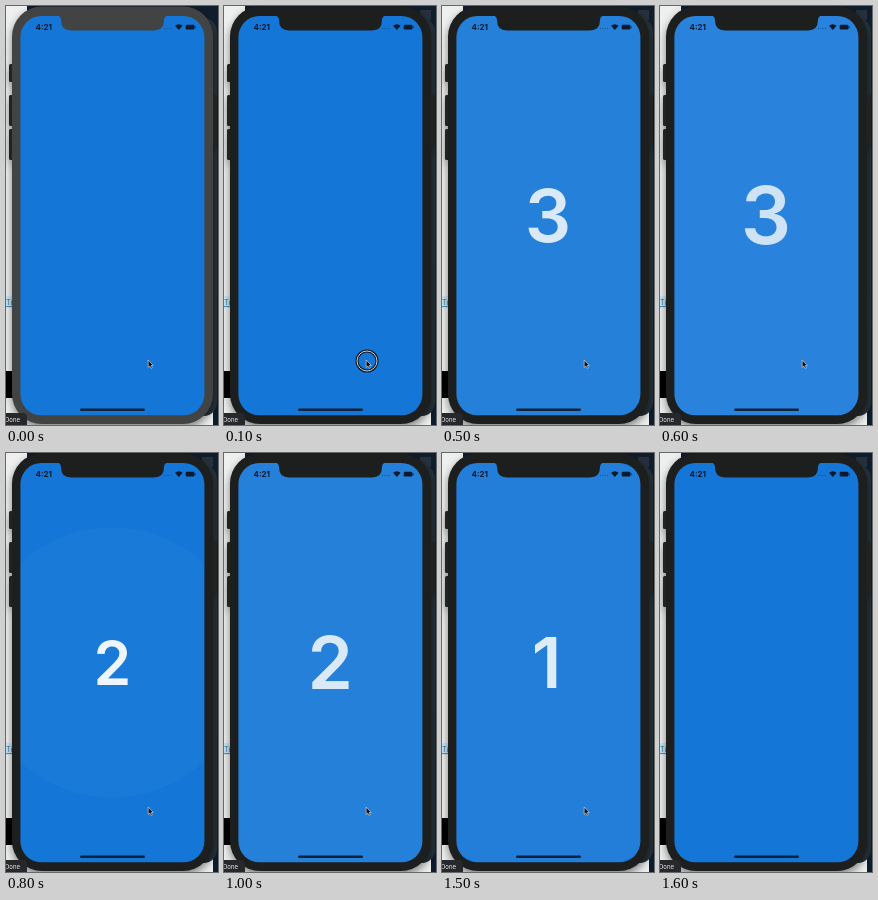
These frames come from a looping animation (212 by 419 pixels, 1700 ms). An HTML page:

```html
<!DOCTYPE html>
<html lang="en">
<head>
<meta charset="utf-8">
<style>
  html, body { margin: 0; width: 100%; height: 100%; overflow: hidden; }
  svg { display: block; width: 212px; height: 419px; font-family: Inter, sans-serif; }
  .shadow { filter: drop-shadow(0 4px 4px #0007); }
</style>
</head>
<body>
<svg viewBox="0 0 212 419">
  <defs>
    <clipPath id="screen"><rect x="14.4" y="10" width="184" height="399.3" rx="21"/></clipPath>
    <linearGradient id="desk" x2="0" y2="1">
      <stop offset="0" stop-color="#0f1d2d"/>
      <stop offset=".5" stop-color="#12263a"/>
      <stop offset="1" stop-color="#0b1c2e"/>
    </linearGradient>
  </defs>

  <!-- desktop behind the phone -->
  <rect width="212" height="419" fill="url(#desk)"/>
  <rect width="21" height="419" fill="#eeefef"/>
  <rect y="385" width="207" height="34" fill="#eeefef"/>
  <rect x="185" y="12" width="26" height="398" rx="14" fill="#26323a"/>
  <rect id="corner" x="196" y="4" width="11" height="10" fill="#26313d"/>
  <rect y="290" width="6" height="12" fill="#cfe6f3"/>
  <text x="0" y="299" font-size="7" fill="#1878ac" text-decoration="underline">Ti</text>
  <rect y="365" width="7" height="27" fill="#000"/>

  <!-- phone -->
  <g class="shadow">
    <g fill="#202321">
      <rect x="3" y="58" width="6" height="18" rx="1.5"/>
      <rect x="3" y="89" width="6" height="31" rx="1.5"/>
      <rect x="3" y="123" width="6" height="31" rx="1.5"/>
      <rect x="204" y="89" width="7" height="51" rx="1.5"/>
    </g>
    <rect id="body" x="6" y="0.5" width="201" height="417.5" rx="30"/>
  </g>
  <path d="M0 407H17Q21 407 21 411V419H0Z" fill="#26282b"/>
  <text x="-1" y="416" font-size="6" fill="#eee">Done</text>
  <g clip-path="url(#screen)">
    <rect x="14" y="10" width="185" height="400" fill="#1476d7"/>
    <circle id="ripple" cx="106" cy="209.5" fill="#fff"/>
    <text id="digit" text-anchor="middle" font-weight="600" fill="#fff"></text>
  </g>
  <path id="notch" d="M51 9.5Q55 10 55 14Q55 24.5 65 24.5H148Q158 24.5 158 14Q158 10 162 9.5Z"/>
  <g fill="#0b1a2c">
    <text x="29.5" y="24" font-size="8" font-weight="700">4:21</text>
    <path d="M158 22.5h8" stroke="#0d559b" stroke-dasharray="1 1.3" fill="none"/>
    <path d="M169 19.8Q172.8 16.6 176.6 19.8L172.8 24Z"/>
    <rect x="179.7" y="18.8" width="8.7" height="4.7" rx="1.2"/>
    <rect x="188.7" y="20.2" width=".8" height="2"/>
    <rect x="74" y="402.5" width="65" height="2.5" rx="1.25" fill="#10233a"/>
  </g>

  <g id="ring" fill="none">
    <circle cx="143" cy="355" r="10" stroke="#10151b" stroke-width="3"/>
    <circle cx="143" cy="355" r="10" stroke="#dfe6ec" stroke-width=".9"/>
  </g>
  <path id="cursor" d="M142.2 354V361.4L143.8 360L145 362.4L146.300 361.800L145.200 359.500H147.300Z" fill="#0a0a0a" stroke="#dfe8f2" stroke-width=".6"/>
</svg>
<script>
const el = id => document.getElementById(id);
const set = (id, attrs) => {
  for (const name in attrs) el(id).setAttribute(name, attrs[name]);
};
const show = (id, on) => set(id, { visibility: on ? 'visible' : 'hidden' });

const LOOP = 1700, STEP = 100, END = 1600;
const counts = [
  { value: 3, start: 154, x: 106 },
  { value: 2, start: 654, x: 106.3 },
  { value: 1, start: 1200, x: 104.5 }
];

function draw(t) {
  const active = t > 0;
  const bezel = { fill: active ? '#1c1f1e' : '#424343' };
  set('body', bezel);
  set('notch', bezel);
  show('corner', active);
  show('ring', t === 100);
  show('cursor', t < END);

  const count = t < END && counts.filter(c => c.start <= t).pop();
  show('ripple', count);
  show('digit', count);
  if (!count) return;

  const age = t - count.start;
  const height = 37.5 + 0.045 * age;
  set('ripple', { r: 62 + 0.5 * age, opacity: 0.0002 * age });
  set('digit', {
    x: count.x,
    y: 209.7 + height / 2,
    'font-size': height / 0.727,
    opacity: 1 - 0.0005 * age
  });
  el('digit').textContent = count.value;
}

const origin = performance.now();
function tick() {
  const t = (performance.now() - origin) % LOOP;
  draw(Math.floor(t / STEP) * STEP);
  requestAnimationFrame(tick);
}
tick();
</script>
</body>
</html>
```
